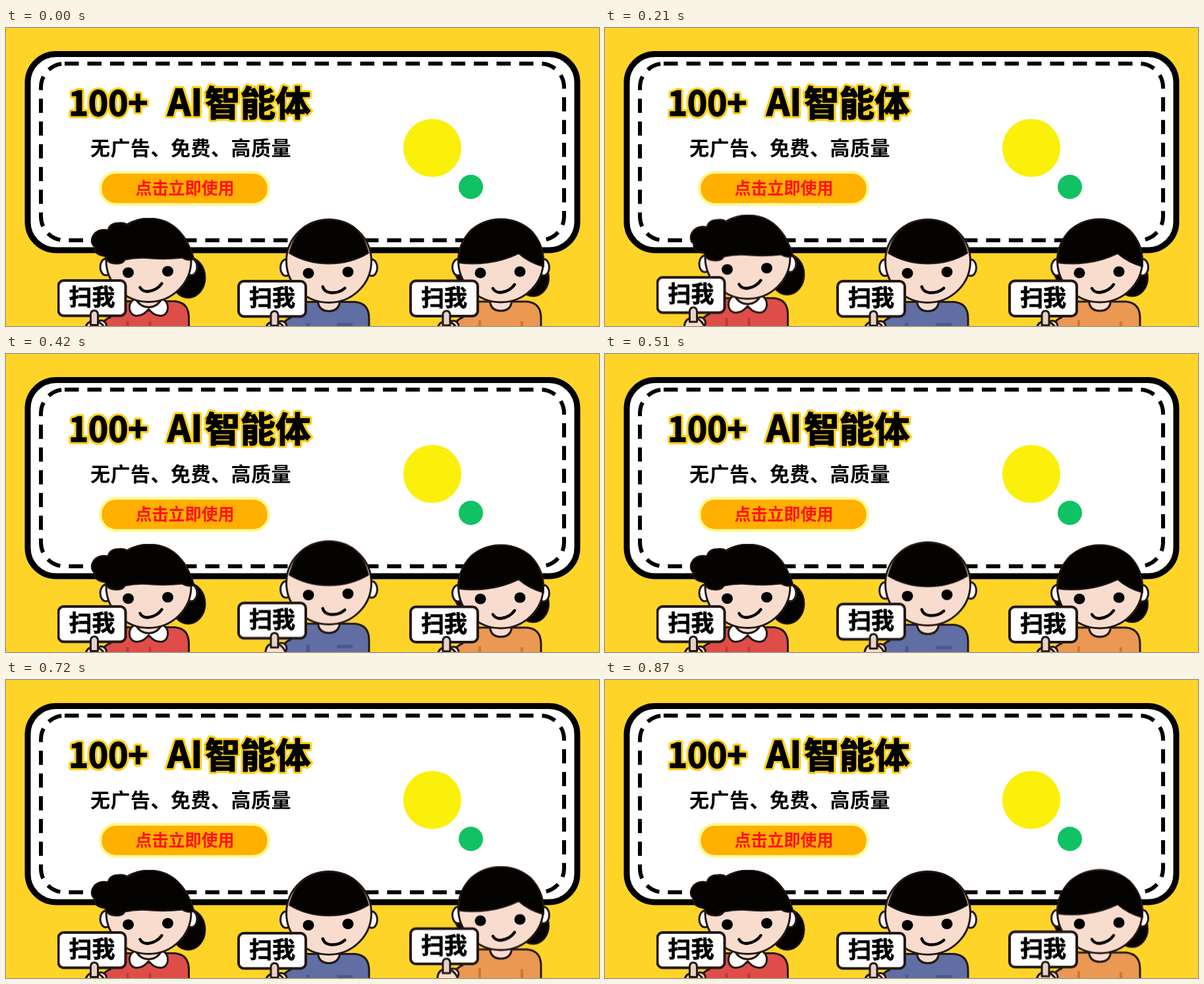
Animation, 900 px wide and 452 px high, one loop 900 ms. Source, as an HTML page:

```html
<!DOCTYPE html>
<html lang="zh-CN">
<head>
<meta charset="utf-8">
<title>100+ AI智能体</title>
<style>
  html, body { margin: 0; width: 100%; height: 100%; overflow: hidden; background: #ffd428; }
  svg { display: block; width: 900px; height: 452px; }
  text { font-family: "Noto Sans CJK SC", "Noto Sans CJK", "Noto Sans", sans-serif; font-weight: 900; }
  .line { stroke: #231815; stroke-width: 3; stroke-linecap: round; stroke-linejoin: round; }
  .skin { fill: #f8ddcf; }
  .hair { fill: #050202; stroke: #231815; stroke-width: 2; stroke-linejoin: round; }
  .title { stroke-linejoin: round; }
  .glow { stroke: #ffd21c; stroke-width: 8; }
  .bold { stroke: #000; stroke-width: 1.5; }

  /* each figure hops for a third of the loop */
  .hop { animation: hop 900ms infinite; }
  .second { animation-delay: -600ms; }
  .third { animation-delay: -300ms; }
  @keyframes hop {
    0% { transform: translateY(0); animation-timing-function: steps(5); }
    16.6667% { transform: translateY(-8px); animation-timing-function: steps(5); }
    33.3333%, 100% { transform: translateY(0); }
  }
</style>
</head>
<body>
<svg viewBox="0 0 900 452">
  <defs>
    <g id="title">
      <text x="95" y="133" font-size="51">100+</text>
      <text x="245" y="133" font-size="55">AI</text>
      <text x="302" y="134" font-size="53.500">智能体</text>
    </g>
    <!-- figure parts, centred on the head -->
    <g id="bust">
      <path class="line" fill="currentColor" d="M-60 120V87Q-58 63-36 62H40Q61 64 61 87V120Z"/>
      <path class="line" fill="currentColor" d="M-58 86Q-66 89-72 98L-62 120H-44"/>
      <path class="line skin" d="M-16 56V65Q-13 76 0 76T16 65V56Z"/>
    </g>
    <g id="head">
      <ellipse class="line" cx="-65" cy="10" rx="8.500" ry="12.500" fill="#fff"/>
      <ellipse class="line" cx="65" cy="10" rx="8.500" ry="12.500" fill="#fff"/>
      <ellipse class="line skin" rx="64.500" ry="63"/>
    </g>
    <g id="front">
      <ellipse cx="-31" cy="18.500" rx="8.500" ry="8"/>
      <ellipse cx="29" cy="16.500" rx="8.500" ry="8"/>
      <rect x="-137" y="30.500" width="102" height="53.500" rx="8" fill="#fff" stroke="#231815" stroke-width="4"/>
      <text class="bold" x="-86" y="68.500" font-size="35" text-anchor="middle" style="stroke-width:.7">扫我</text>
      <circle class="line skin" cx="-72" cy="99" r="8"/>
      <path class="line skin" d="M-96 120V103Q-94 92-83 92T-66 104V120Z"/>
      <path class="line" fill="#e6d2cc" d="M-88 98V81Q-87 76-82.500 76T-77 81V98Z"/>
    </g>
    <path id="smile" d="M-13 41Q-9 48 0 47Q13 45 20 35" fill="none" stroke="#050202" stroke-width="4.500" stroke-linecap="round"/>
  </defs>

  <rect width="900" height="452" fill="#ffd428"/>
  <rect x="33" y="39.500" width="834" height="297.500" rx="43" fill="#fff" stroke="#000" stroke-width="9"/>
  <rect x="53" y="54" width="794" height="268" rx="36" fill="none" stroke="#000" stroke-width="6" stroke-dasharray="21.500 13"/>

  <g class="title">
    <use href="#title" class="glow"/>
    <use href="#title" class="bold"/>
  </g>
  <text x="128" y="193" font-size="30" letter-spacing=".5">无广告、免费、高质量</text>
  <rect x="143.500" y="219" width="255" height="48.500" rx="23" fill="#ffb000" stroke="#fff98f" stroke-width="4"/>
  <text x="271.500" y="251.500" font-size="25" text-anchor="middle" fill="#ff1212">点击立即使用</text>

  <circle cx="647" cy="182" r="44" fill="#faf00a"/>
  <circle cx="705.500" cy="241" r="18.500" fill="#10c264"/>

  <g transform="translate(216.500 352.500)" color="#df4d49">
    <g class="hop">
      <ellipse class="hair" cx="60" cy="26" rx="26" ry="31"/>
      <use href="#bust"/>
      <path d="M-32 92v28M2 92v28" stroke="#b93a3a" stroke-width="4"/>
      <path class="line" fill="#fff" d="M-20 58C-33 62-32 84-18 84C-8 84-4 78 0 74C4 78 8 84 18 84C32 84 33 62 20 58Q13 71 0 71T-20 58Z"/>
      <use href="#head"/>
      <path class="hair" d="M-36-1Q-39 6-51 5Q-64 4-66-6Q-84-9-82-20Q-91-29-83-40Q-75-49-62-46Q-59-57-46-57Q-37-58-32-54Q-18-64 0-64Q36-64 55-33Q65-18 69-2Q60 2 51-4Q26-1 4-3Q-17-5-36-1Z"/>
      <use href="#front"/>
      <use href="#smile"/>
    </g>
  </g>

  <g transform="translate(490 353.500)" color="#606ea3">
    <g class="hop second">
      <use href="#bust"/>
      <path d="M-32 94v26M12 96.500h24" stroke="#4b5790" stroke-width="5"/>
      <use href="#head"/>
      <path class="hair" d="M-60-12Q-53-40-35-53Q-18-63 0-63T36-53Q54-39 60-12Q34 4 0 4T-60-12Z"/>
      <use href="#front"/>
      <use href="#smile" transform="translate(3 2) rotate(14 4 42)"/>
    </g>
  </g>

  <g transform="translate(751 353)" color="#ea9852">
    <g class="hop third">
      <ellipse class="hair" cx="49" cy="26" rx="24" ry="28"/>
      <path class="hair" d="M-67-2Q-72 6-70 17Q-67 32-55 36V-2Z"/>
      <use href="#bust"/>
      <path d="M-32 90v30M32 92v28" stroke="#cf7630" stroke-width="4"/>
      <use href="#head"/>
      <path class="hair" d="M-64 3Q-65-27-45-47Q-26-63 0-63T45-47Q66-26 65 9Q43 3 27-11Q4 0-20 3Q-43 6-64 3Z"/>
      <use href="#front"/>
      <use href="#smile" transform="translate(1 1)"/>
    </g>
  </g>
</svg>
</body>
</html>
```
